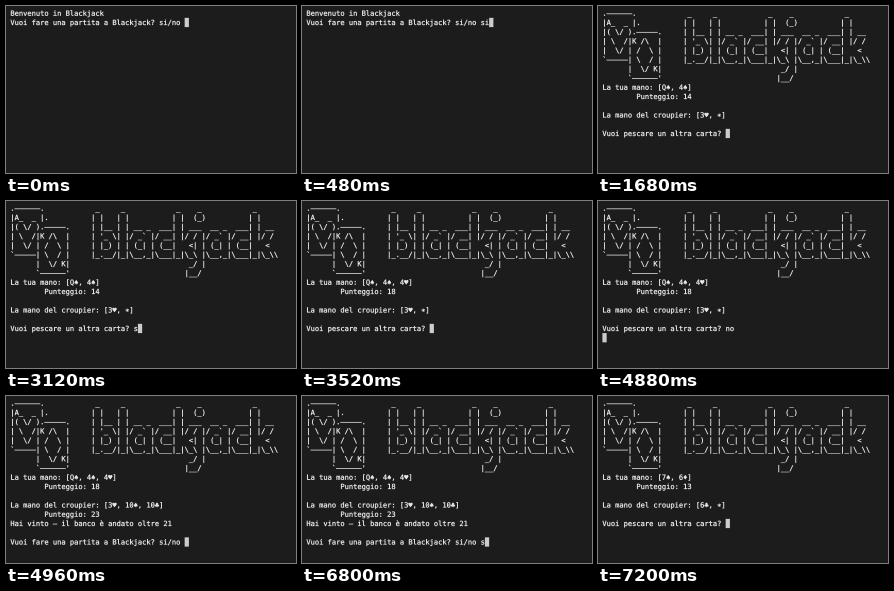
An HTML page with a canvas that plays this animation: 290x167 px, repeating every 8000 ms.

```html
<!DOCTYPE html>
<html lang="it">
<head>
<meta charset="utf-8">
<title>Blackjack</title>
<style>
  html, body { margin: 0; width: 100%; height: 100%; overflow: hidden; background: #1c1c1c; }
  canvas { display: block; width: 290px; height: 167px; }
</style>
</head>
<body>
<canvas id="stage" width="290" height="167"></canvas>
<script>
const WIDTH = 290, HEIGHT = 167, LOOP = 8000;
const LEFT = 4.4, TOP = 2.6, CELL = 4.25, LINE = 9.25, BASELINE = 7.05;
const SCALE = 4; // text is drawn large, then reduced, for even spacing

const LOGO = [
  ".––––––.            _     _            _    _            _",
  "|A_  _ |.          | |   | |          | |  (_)          | |",
  "|( \\/ ).–––––.     | |__ | | __ _  ___| | ___  __ _  ___| | __",
  "| \\  /|K /\\  |     | '_ \\| |/ _` |/ __| |/ / |/ _` |/ __| |/ /",
  "|  \\/ | /  \\ |     | |_) | | (_| | (__|   <| | (_| | (__|   <",
  "`–––––| \\  / |     |_.__/|_|\\__,_|\\___|_|\\_\\ |\\__,_|\\___|_|\\_\\\\",
  "      |  \\/ K|                            _/ |",
  "      `––––––'                           |__/"
];
const PLAY = "Vuoi fare una partita a Blackjack? si/no ";
const DRAW = "Vuoi pescare un altra carta? ";

const hand = (cards, points) => [`La tua mano: [${cards}]`, `        Punteggio: ${points}`, ""];
const dealer = cards => `La mano del croupier: [${cards}]`;
const turn = (cards, points, shown) =>
  [...LOGO, ...hand(cards, points), dealer(shown + ", ∗"), "", DRAW];

const welcome = ["Benvenuto in Blackjack", PLAY];
const firstTurn = turn("Q♠, 4♠", 14, "3♥");
const secondTurn = turn("Q♠, 4♠, 4♥", 18, "3♥");
const result = [
  ...LOGO, ...hand("Q♠, 4♠, 4♥", 18),
  dealer("3♥, 10♠, 10♣"), "        Punteggio: 23",
  "Hai vinto – il banco è andato oltre 21", "", PLAY
];
const nextGame = turn("7♠, 6♦", 13, "6♣");

// [start in ms, screen, typed input]
const steps = [
  [0, welcome, ""], [400, welcome, "s"], [480, welcome, "si"],
  [1680, firstTurn, ""], [3120, firstTurn, "s"], [3280, firstTurn, "si"], [3440, firstTurn, "si\n"],
  [3520, secondTurn, ""], [4400, secondTurn, "n"], [4640, secondTurn, "no"], [4880, secondTurn, "no\n"],
  [4960, result, ""], [6800, result, "s"], [6960, result, "si"],
  [7200, nextGame, ""]
];

const stage = document.getElementById("stage").getContext("2d");
const buffer = document.createElement("canvas");
buffer.width = WIDTH * SCALE;
buffer.height = HEIGHT * SCALE;
const pen = buffer.getContext("2d");
stage.imageSmoothingQuality = "high";

function drawChar(char, x, y) {
  pen.fillText(char, x, y);
  pen.strokeText(char, x, y);
}

function render(screen, typed) {
  const lines = (screen.join("\n") + typed).split("\n");
  pen.setTransform(SCALE, 0, 0, SCALE, 0, 0);
  pen.fillStyle = "#1c1c1c";
  pen.fillRect(0, 0, WIDTH, HEIGHT);
  pen.fillStyle = pen.strokeStyle = "#e6e6e6";
  pen.lineWidth = 0.3; // slightly heavier strokes
  pen.lineJoin = "round";
  pen.font = '7.06px "DejaVu Sans Mono", monospace';
  lines.forEach((line, row) => {
    [...line].forEach((char, col) =>
      drawChar(char, LEFT + col * CELL, TOP + row * LINE + BASELINE));
  });
  const row = lines.length - 1;
  pen.fillStyle = "#cccccc";
  pen.fillRect(LEFT + lines[row].length * CELL, TOP + row * LINE, CELL, LINE);
  stage.drawImage(buffer, 0, 0, WIDTH, HEIGHT);
}

let shown = null;
function tick() {
  const time = performance.now() % LOOP;
  const step = steps.findLast(([start]) => start <= time);
  if (step !== shown) {
    shown = step;
    render(step[1], step[2]);
  }
  requestAnimationFrame(tick);
}
tick();
</script>
</body>
</html>
```
